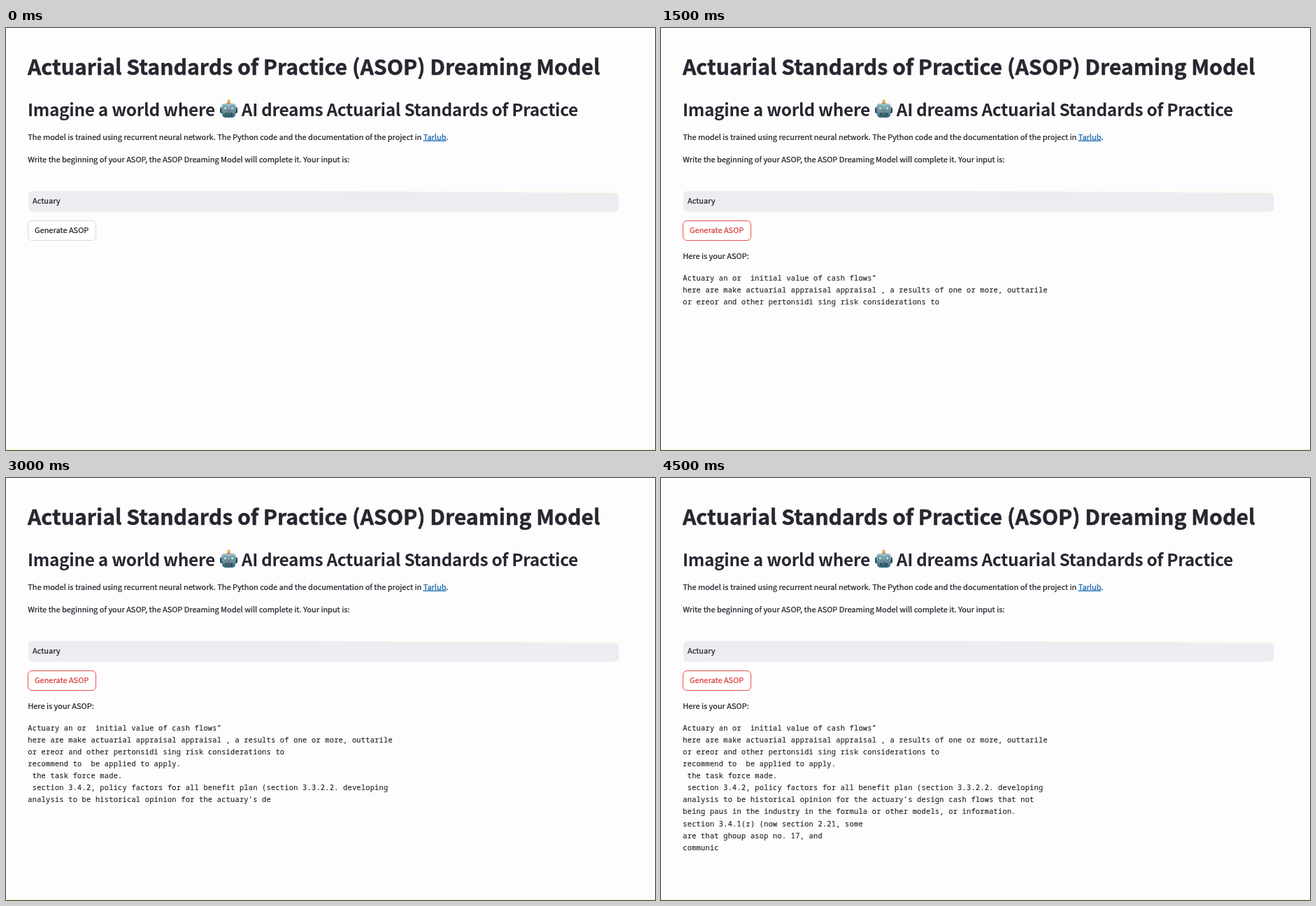
An HTML page that plays this animation: 928 by 603 pixels, repeating every 5000 ms.

```html
<!DOCTYPE html>
<html lang="en">
<head>
<meta charset="utf-8">
<title>ASOP Dreaming Model</title>
<style>
  html, body { margin: 0; width: 100%; height: 100%; overflow: hidden; background: #fdfdfd; }
  svg { display: block; width: 928px; height: 603px; }
  text {
    font: 10.99px "Noto Sans CJK JP", "Noto Sans CJK SC", "Noto Sans CJK", "Open Sans", sans-serif;
    color: #1f212a;
    white-space: pre;
  }
  text, tspan { fill: currentColor; stroke: currentColor; stroke-width: .22px; }
  .title { font-size: 30.23px; font-weight: 700; color: #262730; stroke-width: .5px; }
  .subtitle { font-size: 24.4px; font-weight: 600; letter-spacing: -.0125em; color: #262730; stroke: none; }
  .link { color: #0f62ae; text-decoration: underline; }
  #output text {
    font: 10.2px "Noto Sans Mono", "DejaVu Sans Mono", monospace;
    letter-spacing: .032em;
    stroke-width: .15px;
  }
  #button rect { fill: #fff; stroke: #d9d9d6; }
  #button.active rect { stroke: #e8524c; }
  #button.active text { color: #d93a38; }
</style>
</head>
<body>
<svg viewBox="0 0 928 603">
  <defs>
    <linearGradient id="metal" x1="0" y1="0" x2="0" y2="1">
      <stop offset="0" stop-color="#a3c3ca"/>
      <stop offset=".5" stop-color="#669daa"/>
      <stop offset="1" stop-color="#2c6070"/>
    </linearGradient>
  </defs>
  <rect width="928" height="603" fill="#fdfdfd"/>
  <rect y="602" width="928" height="1" fill="#f8f8ae"/>

  <text class="title" x="31" y="67">Actuarial Standards of Practice (ASOP) Dreaming Model</text>
  <text class="subtitle" x="31" y="126.3">Imagine a world where</text>
  <text class="subtitle" x="336.8" y="126.3">AI dreams Actuarial Standards of Practice</text>

  <g id="robot">
    <rect x="306" y="113" width="25" height="9" rx="2.5" fill="#36454f"/>
    <path d="M314 109Q318.5 103 323 109Z" fill="#c9713f"/>
    <circle cx="318.5" cy="104.5" r="2.2" fill="#e9b14c"/>
    <path d="M311 108H326Q329 109 329 113L328 124Q327 128 323 128H314Q310 128 309 124L308 113Q308 109 311 108Z" fill="url(#metal)"/>
    <g fill="#e6f5f4" stroke="#32505b">
      <circle cx="313.5" cy="114.5" r="2.7"/>
      <circle cx="323.5" cy="114.5" r="2.7"/>
    </g>
    <g fill="#4fb5c4">
      <circle cx="313.5" cy="114.5" r="1.1"/>
      <circle cx="323.5" cy="114.5" r="1.1"/>
    </g>
    <path d="M318.5 116.5l1.8 3h-3.6z" fill="#b6504a"/>
    <rect x="313" y="121.5" width="11" height="3.5" rx="1.5" fill="#263e48"/>
    <path d="M315 123.2H322" stroke="#c5d7d8" stroke-dasharray="1.5 1"/>
  </g>

  <text x="31.2" y="159.7">The model is trained using recurrent neural network. The Python code and the documentation of the project in <tspan class="link">Tarlub</tspan>.</text>
  <text x="31.2" y="191.8">Write the beginning of your ASOP, the ASOP Dreaming Model will complete it. Your input is:</text>

  <path d="M440 233H870Q876 233 876 239L870 236Z" fill="#fbfbec"/>
  <path d="M38 233H440L870 236Q876.5 236 876.5 242V256Q876.5 262.5 870 262.5H38Q32 262.5 32 256V239Q32 233 38 233Z" fill="#ecedf0"/>
  <text x="38" y="251">Actuary</text>

  <g id="button">
    <rect x="31.5" y="275.5" width="97" height="28" rx="5.5"/>
    <text x="41" y="293.2">Generate ASOP</text>
  </g>
  <text id="caption" x="31.2" y="330">Here is your ASOP:</text>
  <g id="output"></g>
</svg>
<script>
const STEP = 500, LOOP = 5000;
const LINE_HEIGHT = 17.12;

const story = [
  "Actuary an or  initial value of cash flows”",
  "here are make actuarial appraisal appraisal , a results of one or more, outtarile",
  "or ereor and other pertonsidi sing risk considerations to",
  "recommend to  be applied to apply.",
  " the task force made.",
  " section 3.4.2, policy factors for all benefit plan (section 3.3.2.2. developing",
  "analysis to be historical opinion for the actuary’s design cash flows that not",
  "being paus in the industry in the formula or other models, or information.",
  "section 3.4.1(r) (now section 2.21, some",
  "are that ghoup asop no. 17, and",
  "communic"
].join("\n");

// Last words typed at each step after the button press.
const stops = [
  "\nhere", "more,", "considerations to", "\n sectio", "2.2. dev",
  "actuary’s de", "in the for", "3.4.1(r)", "communic"
].map(words => story.indexOf(words) + words.length);

const output = document.getElementById("output");
const button = document.getElementById("button");
const caption = document.getElementById("caption");

const rows = story.split("\n").map((_, i) => {
  const row = document.createElementNS("http://www.w3.org/2000/svg", "text");
  row.setAttribute("x", 31.3);
  row.setAttribute("y", 360.6 + i * LINE_HEIGHT);
  return output.appendChild(row);
});

let shown = -1;
function show(step) {
  if (step === shown) return;
  shown = step;
  const typed = step ? story.slice(0, stops[step - 1]).split("\n") : [];
  rows.forEach((row, i) => { row.textContent = typed[i] || ""; });
  button.classList.toggle("active", step > 0);
  caption.style.visibility = step ? "visible" : "hidden";
}

const start = performance.now();
function tick(now) {
  show(Math.floor((Math.max(0, now - start) % LOOP) / STEP));
  requestAnimationFrame(tick);
}
show(0);
requestAnimationFrame(tick);
</script>
</body>
</html>
```
